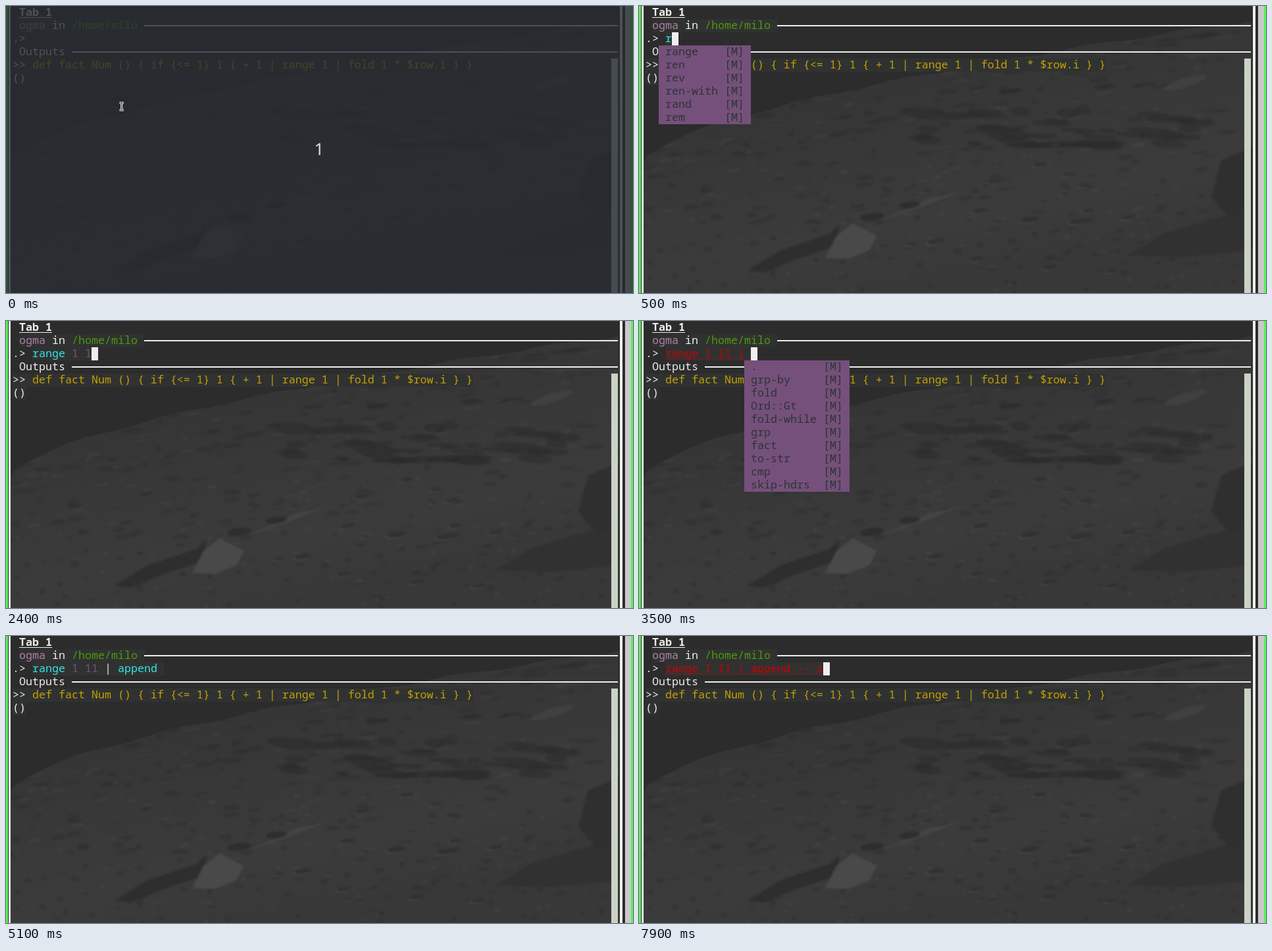
Animation, 953 px wide and 437 px high, one loop 8000 ms. Source, as an HTML page with a canvas:

```html
<!DOCTYPE html>
<html lang="en">
<head>
<meta charset="utf-8">
<title>Terminal session</title>
<style>
  html, body { margin: 0; width: 100%; height: 100%; overflow: hidden; background: #2c2c2c; }
  canvas, svg { position: absolute; left: 0; top: 0; width: 953px; height: 437px; display: block; }
  text { font: 500 16.6667px "Noto Sans Mono", "DejaVu Sans Mono", monospace; white-space: pre; fill: #eeeeec; }
  #count { font: 26px "Noto Sans", "Open Sans", sans-serif; fill: #dcdcdc; text-anchor: middle; }
</style>
</head>
<body>
<canvas id="moon" width="953" height="437"></canvas>
<svg viewBox="0 0 953 437">
  <g id="screen"></g>
  <g id="prompt"></g>
  <g id="edges">
    <rect x="920" y="80" width="10" height="357" fill="#cbd2c6"/>
    <rect width="7" height="437" fill="#2b2b2b"/>
    <rect width="3" height="437" fill="#55f555"/>
    <rect x="4" width="3" height="437" fill="#eeeeec"/>
    <rect x="933" width="4" height="437" fill="#eeeeec"/>
    <rect x="937" width="4" height="437" fill="#2b2b2b"/>
    <rect x="941" width="9" height="437" fill="#cbc7cb"/>
    <rect x="950" width="3" height="437" fill="#55f555"/>
  </g>
  <rect id="shade" width="953" height="437" fill="#262b30" fill-opacity=".8"/>
  <g id="pointer" fill="none">
    <path id="beam" d="M172.5 147.5H179M172.5 158.5H179M175.7 147.5V158.5" stroke="#fff" stroke-width="3"/>
    <path d="M172.5 147.5H179M172.5 158.5H179M175.7 147.5V158.5" stroke="#222"/>
  </g>
  <text id="count" x="476" y="227">1</text>
</svg>
<script>
const LOOP = 8000, CELL = 10, ROW = 20, FIRST = 4;
const WHITE = '#eeeeec', CYAN = '#34e2e2', PURPLE = '#75507b', RED = '#cc0000', PLATE = '#303232';
const $ = id => document.getElementById(id);

const TYPED = 'range 1 11 | append --`i';
// moment of each keystroke, in tenths of a second
const KEYS = [5, 7, 8, 10, 11, 14, 19, 21, 24, 26, 27, 32, 35, 36, 38, 40, 41, 43, 44, 45, 64, 66, 77, 79];
const CURSOR_OFF = [[0, 100], [5100, 5700], [7100, 7600]];
const COMMANDS = ('. grp-by fold Ord::Gt fold-while grp fact to-str cmp skip-hdrs ' +
  'range ren rev ren-with rand rem and append append-row abs -').split(' ');

const esc = s => s.replace(/&/g, '&amp;').replace(/</g, '&lt;');
const rect = (x, y, w, h, fill) => `<rect x="${x}" y="${y}" width="${w}" height="${h}" fill="${fill}"/>`;
const span = (s, fill) => `<tspan fill="${fill}">${esc(s)}</tspan>`;
const line = (col, row, body, attrs = '') =>
  `<text x="${col * CELL}" y="${row * ROW + 15}" ${attrs}>${body}</text>`;
const plate = (col, row, cells) => rect(col * CELL, row * ROW, cells * CELL, ROW, PLATE);

function drawScreen() {
  const code = 'def fact Num () { if {<= 1} 1 { + 1 | range 1 | fold 1 * $row.i } }';
  $('screen').innerHTML =
    plate(2, 1, 19) + plate(1, 4, code.length + 3) + plate(1, 5, 2) +
    line(2, 0, 'Tab 1', 'style="font-weight:700"') + rect(20, 17, 50, 1, WHITE) +
    line(2, 1, span('ogma', '#ad7fa8') + ' in ' + span('/home/milo', '#4e9a06')) +
    rect(210, 29, 720, 2, WHITE) +
    line(1, 2, '.&gt;') +
    line(2, 3, 'Outputs') + rect(100, 69, 830, 2, WHITE) +
    line(1, 4, '&gt;&gt; ' + span(code, '#c4a000')) +
    line(1, 5, '()');
}

// the word after the start or a pipe is a command
function colourWords(input) {
  let command = true;
  return input.split(/(\s+)/).map(word => {
    if (!word.trim()) return word;
    const fill = word === '|' ? WHITE : command ? CYAN : PURPLE;
    command = word === '|';
    return span(word, fill);
  }).join('');
}

function menuFor(input) {
  const word = input.match(/\S*$/)[0];
  if (!word && !input.endsWith('| ')) return '';
  const names = COMMANDS.filter(n => n.startsWith(word)).slice(0, 10);
  if (!names.length) return '';
  const col = FIRST + input.length - word.length;
  const pad = Math.max(...names.map(n => n.length));
  return rect((col - 1) * CELL, 3 * ROW, (pad + 6) * CELL, names.length * ROW, PURPLE) +
    names.map((n, i) => line(col, 3 + i, span(n.padEnd(pad) + ' [M]', '#2e3436'))).join('');
}

function promptMarkup(input, cursor) {
  const left = FIRST * CELL, end = left + input.length * CELL;
  const error = /\|\s*$|`/.test(input);
  let out = plate(FIRST, 2, input.length) +
    line(FIRST, 2, error ? span(input, RED) : colourWords(input));
  if (error) out += `<path d="M${left} 57.5H${end}" stroke="${RED}" stroke-dasharray="1 1"/>`;
  if (cursor) out += rect(end, 2 * ROW, CELL, ROW, '#f2eef0');
  return out + menuFor(input);
}

function drawMoon() {
  const c = $('moon').getContext('2d');
  let seed = 11;
  const rnd = () => (seed = seed * 16807 % 2147483647) / 2147483647;
  const shape = (path, fill) => {
    c.fillStyle = fill;
    c.fill(new Path2D(path));
  };
  const blob = (x, y, rx, ry, fill, tilt = -.12) => {
    c.beginPath();
    c.ellipse(x, y, rx, ry, tilt, 0, 7);
    c.fillStyle = fill;
    c.fill();
  };
  const horizon = x => 236 - 214 * Math.max(0, (x - 7) / 926) ** .63;

  c.fillStyle = '#2c2c2c';
  c.fillRect(0, 0, 953, 437);
  c.beginPath();
  c.moveTo(7, 437);
  for (let x = 7; x <= 933; x += 6) c.lineTo(x, horizon(x) + 2 * Math.sin(x / 23));
  c.lineTo(933, 437);
  c.clip();

  const ground = c.createLinearGradient(300, 60, 380, 437);
  ground.addColorStop(0, '#333');
  ground.addColorStop(.45, '#383838');
  ground.addColorStop(.75, '#3b3b3b');
  ground.addColorStop(1, '#383838');
  c.fillStyle = ground;
  c.fillRect(0, 0, 953, 437);

  // rough ground: streaks widen towards the far hills
  c.filter = 'blur(1.5px)';
  for (let i = 0; i < 500; i++) {
    const x = rnd() * 933, y = horizon(x) + rnd() * (437 - horizon(x));
    const far = 1 - y / 437;
    blob(x, y, 4 + rnd() * 22 * far, 1 + rnd() * 3, rnd() < .6 ? 'rgba(42,42,42,.4)' : 'rgba(74,74,74,.25)');
  }
  // shaded band below the hills
  for (let i = 0; i < 45; i++) {
    blob(420 + rnd() * 430, 160 + rnd() * 54, 10 + rnd() * 26, 2 + rnd() * 5, 'rgba(42,42,42,.5)', .05);
  }
  // craters on the plain
  for (let i = 0; i < 24; i++) {
    const x = 400 + rnd() * 420, y = 240 + rnd() * 180, r = 4 + rnd() * 11;
    blob(x - 3, y + 2, r, r * .35, '#434343');
    blob(x, y, r, r * .3, '#313131');
  }
  // ridge: shadow, sunlit face, spur, and the cliffs at the right
  shape('M165 403L215 372 290 347 305 332 300 365 235 387 190 406Z', '#2e2e2e');
  shape('M283 384L300 350 325 331 362 350 350 372 318 385Z', '#494949');
  shape('M365 328L440 293 488 283 430 306Z', '#444');
  blob(354, 321, 18, 6, '#2e2e2e');
  blob(411, 303, 16, 5, '#2e2e2e');
  shape('M742 380L800 346 933 306V372L830 382Z', '#313131');
  shape('M933 215L885 235 870 290 900 325 933 300Z', '#2f2f2f');
  blob(830, 117, 34, 7, '#404040', -.3);
}

drawMoon();
drawScreen();

const start = performance.now();
let shown = null;
function tick() {
  const t = (performance.now() - start) % LOOP;
  const input = TYPED.slice(0, KEYS.filter(k => k * 100 <= t).length);
  const cursor = !CURSOR_OFF.some(([from, to]) => t >= from && t < to);
  const markup = promptMarkup(input, cursor);
  if (markup !== shown) $('prompt').innerHTML = shown = markup;
  $('shade').style.display = $('count').style.display = t < 100 ? '' : 'none';
  $('pointer').style.display = input ? 'none' : '';
  requestAnimationFrame(tick);
}
tick();
</script>
</body>
</html>
```
